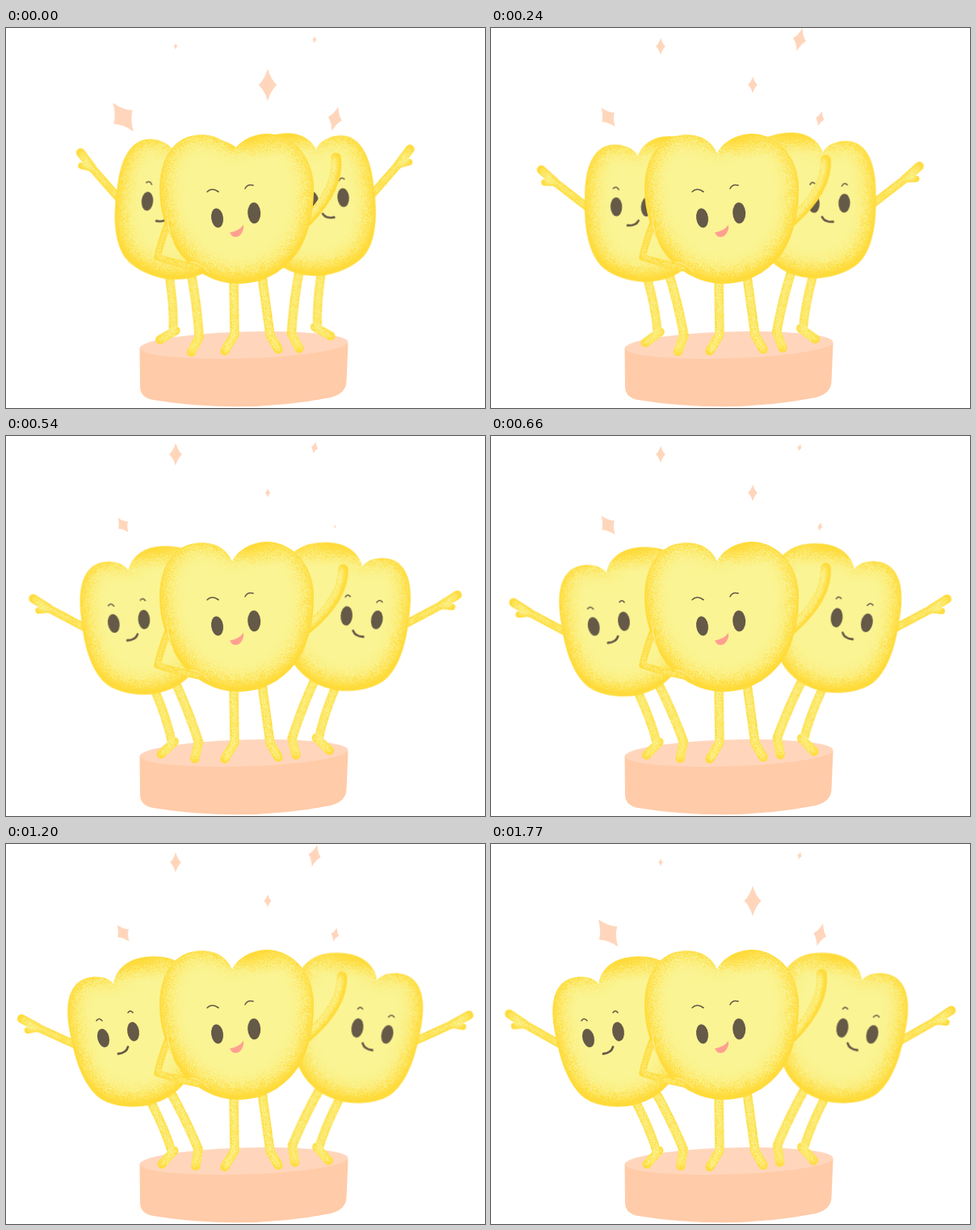
An HTML page with a canvas that plays this animation: 593 px wide and 471 px high, repeating every 1800 ms.

```html
<!DOCTYPE html>
<html lang="en">
<head>
<meta charset="utf-8">
<title>Three happy beans</title>
<style>
  html, body { margin: 0; width: 100%; height: 100%; overflow: hidden; background: #fff; }
  canvas { display: block; }
</style>
</head>
<body>
<canvas id="stage" width="593" height="471"></canvas>
<script>
const W = 593, H = 471, LOOP = 1800, HALF = LOOP / 2, STEP = 30;
const PALE = [250, 244, 148], GOLD = [255, 219, 58];
const INK = '#655947', PEACH = '#ffd6bc';
const SWAY = 18.7, WAVE = 8.5;

const stage = document.getElementById('stage').getContext('2d');
const radians = degrees => degrees * Math.PI / 180;
const clamp = v => Math.max(0, Math.min(1, v));

let seed = 7;
function random() {
  seed = (seed * 1664525 + 1013904223) % 4294967296;
  return seed / 4294967296;
}

function layer() {
  const canvas = document.createElement('canvas');
  canvas.width = W;
  canvas.height = H;
  return canvas.getContext('2d', { willReadFrequently: true });
}

function line(ctx, path, width, color) {
  ctx.lineWidth = width;
  ctx.lineCap = ctx.lineJoin = 'round';
  ctx.strokeStyle = color;
  ctx.stroke(new Path2D(path));
}

function eye(ctx, x, y, rx, ry, tilt) {
  ctx.fillStyle = INK;
  ctx.beginPath();
  ctx.ellipse(x, y, rx, ry, radians(tilt), 0, 7);
  ctx.fill();
}

// Grainy golden rim around a pale silhouette, heavier on the side away from the shift.
function plush(ctx, drawShape, { blur = 5, gain = 1.6, shift = [0, 0], glow } = {}) {
  const mask = layer(), soft = layer();
  drawShape(mask);
  soft.filter = `blur(${blur}px)`;
  soft.drawImage(mask.canvas, ...shift);
  const image = mask.getImageData(0, 0, W, H), px = image.data;
  const depth = soft.getImageData(0, 0, W, H).data;
  for (let i = 0; i < px.length; i += 4) {
    if (!px[i + 3]) continue;
    let shade = (1 - depth[i + 3] / 255) * gain;
    if (glow) {
      const x = i / 4 % W, y = Math.floor(i / 4 / W);
      shade += 0.5 * Math.max(0, 1 - Math.hypot(x - glow[0], 2 * (y - glow[1])) / 46);
    }
    shade = clamp(shade);
    shade = clamp(shade + (random() - 0.5) * 3.6 * shade * (1 - shade));
    for (let c = 0; c < 3; c++) px[i + c] = PALE[c] + (GOLD[c] - PALE[c]) * shade;
  }
  mask.putImageData(image, 0, 0);
  ctx.drawImage(mask.canvas, 0, 0);
}

function limbs(ctx, strokes, look) {
  plush(ctx, mask => strokes.forEach(([path, width]) => line(mask, path, width, '#000')), look);
  return ctx;
}

function torso(ctx, outline, glow) {
  plush(ctx, mask => mask.fill(new Path2D(outline)), { blur: 14, gain: 1.85, shift: [0, -5], glow });
  return ctx;
}

// The side bean in its leaning pose; the other side is its mirror image.
const sideArm = limbs(layer(), [
  ['M92 252L42 223', 10], ['M42 223L23 210', 11], ['M42 224L29 225', 8]
], { gain: 2 });

const sideLegs = limbs(layer(), [
  ['M179 319Q197 354 204 378L208 380L193 397', 11],
  ['M204 308Q223 342 238 378L235 399', 11.5]
]);

const side = torso(layer(),
  'M133 173C126 163 103 161 90 171C74 184 74 210 80 238C86 271 97 300 116 315' +
  'C130 325 155 328 175 324C200 318 214 306 224 292C236 275 242 240 240 205' +
  'C238 175 228 145 195 140C165 136 138 146 133 173Z', [170, 147]);
eye(side, 120.5, 240.5, 7.2, 11.7, -14);
eye(side, 157.5, 232.5, 7.3, 12, -9);
line(side, 'M112 219Q115 214.5 119 219M151 209Q154 205 157 209', 1.6, INK);
line(side, 'M139 260Q149 259 151 251.5', 2.8, INK);

const raisedArm = limbs(layer(), [['M408.500 161Q413 197 373 239', 13]], { gain: 1.9, shift: [-3, 0] });

const center = limbs(layer(), [
  ['M282 312L283 380L271 400', 11.5],
  ['M317 308L327 381L337 398', 11.5]
]);
torso(center,
  'M280 155C272 138 257 131 236 132.5C204 136 190 167 190 200C190 226 198 250 211 273' +
  'C228 300 257 317 288 317C323 317 351 297 366 270C377 248 382 220 381 193' +
  'C378 155 352 131 322 131C302 132 287 142 280 155Z', [312, 140]);
eye(center, 261.5, 235.5, 7.4, 12, -8);
eye(center, 307.2, 229.3, 8, 13, -2);
line(center, 'M249 203Q255 197 263 203M296 199Q299 193 306 195', 1.6, INK);
center.fillStyle = '#ff9f92';
center.fill(new Path2D('M277 253.5Q288 252 294 244Q295 252 289 257.5Q281 262 277 253.5Z'));
limbs(center, [['M200 243Q191 267 187.5 284Q210 292 242 298', 8.5]], { gain: 1.8 });
line(center, 'M200 236Q201 253 207 265M228 290Q241 291 251 303', 0.9, 'rgba(255,253,225,.75)');

// Each sparkle swings between two half heights, turning at the given times.
const EVEN = [0, HALF / 2, HALF, HALF * 1.5, LOOP];
const sparkles = [
  { x: 145, y: 110.5, tilt: -36, ratio: 0.66, from: 21.8, to: 8.3 },
  { x: 210, y: 22.8, from: 4, to: 16.5 },
  { x: 324, y: 70.5, from: 20, to: 2 },
  { x: 382, y: 14.5, tilt: 14, from: 4.3, to: 15, turns: [0, 250, 650, 1130, LOOP] },
  { x: 407.3, y: 112.5, tilt: 15, from: 15.5, to: 2, turns: [0, 530, 1060, 1340, LOOP] }
];

function drawSparkle({ x, y, tilt = 0, ratio = 0.56, from, to, turns = EVEN }, t) {
  const i = turns.findIndex(turn => turn > t);
  const part = (t - turns[i - 1]) / (turns[i] - turns[i - 1]);
  const size = from + (to - from) * (i % 2 ? part : 1 - part);
  stage.save();
  stage.translate(x, y);
  stage.rotate(radians(tilt));
  stage.scale(size * ratio, size);
  stage.fillStyle = PEACH;
  stage.fill(new Path2D('M0-1Q.35-.34 1 0Q.35.34 0 1Q-.35.34-1 0Q-.35-.34 0-1Z'));
  stage.restore();
}

function drawPodium() {
  stage.fillStyle = '#ffcba8';
  stage.fill(new Path2D('M165.5 397L166 446Q167 458 182 461Q295 479 402 458Q421 453 421.5 438L423.5 391Z'));
  stage.fillStyle = PEACH;
  stage.beginPath();
  stage.ellipse(294.5, 393, 129, 16.5, -0.03, 0, 7);
  stage.fill();
}

function turned(x, y, degrees, paint) {
  stage.save();
  stage.translate(x, y);
  stage.rotate(radians(degrees));
  stage.translate(-x, -y);
  paint();
  stage.restore();
}

const show = ctx => stage.drawImage(ctx.canvas, 0, 0);

function drawSide(lean, wave) {
  turned(224, 384, lean, () => show(sideLegs));
  turned(226, 393, lean, () => {
    turned(88, 250, -WAVE * wave, () => show(sideArm));
    show(side);
  });
}

function draw(t) {
  const u = Math.min(1, t / HALF);
  const sway = u + 0.8 * u ** 1.5 * (1 - u);
  const lean = SWAY * (1 - sway);
  const wave = 1 - Math.abs(1 - t % HALF / (HALF / 2));
  stage.fillStyle = '#fff';
  stage.fillRect(0, 0, W, H);
  sparkles.forEach(s => drawSparkle(s, t));
  drawPodium();
  drawSide(lean, wave);
  stage.save();
  stage.translate(592.5, -4.5);
  stage.scale(-1, 1);
  drawSide(lean, wave);
  stage.restore();
  turned(376, 238, WAVE * wave, () => show(raisedArm));
  show(center);
}

const start = performance.now();
function tick() {
  const t = (performance.now() - start) % LOOP;
  draw(Math.floor(t / STEP) * STEP);
  requestAnimationFrame(tick);
}
tick();
</script>
</body>
</html>
```
